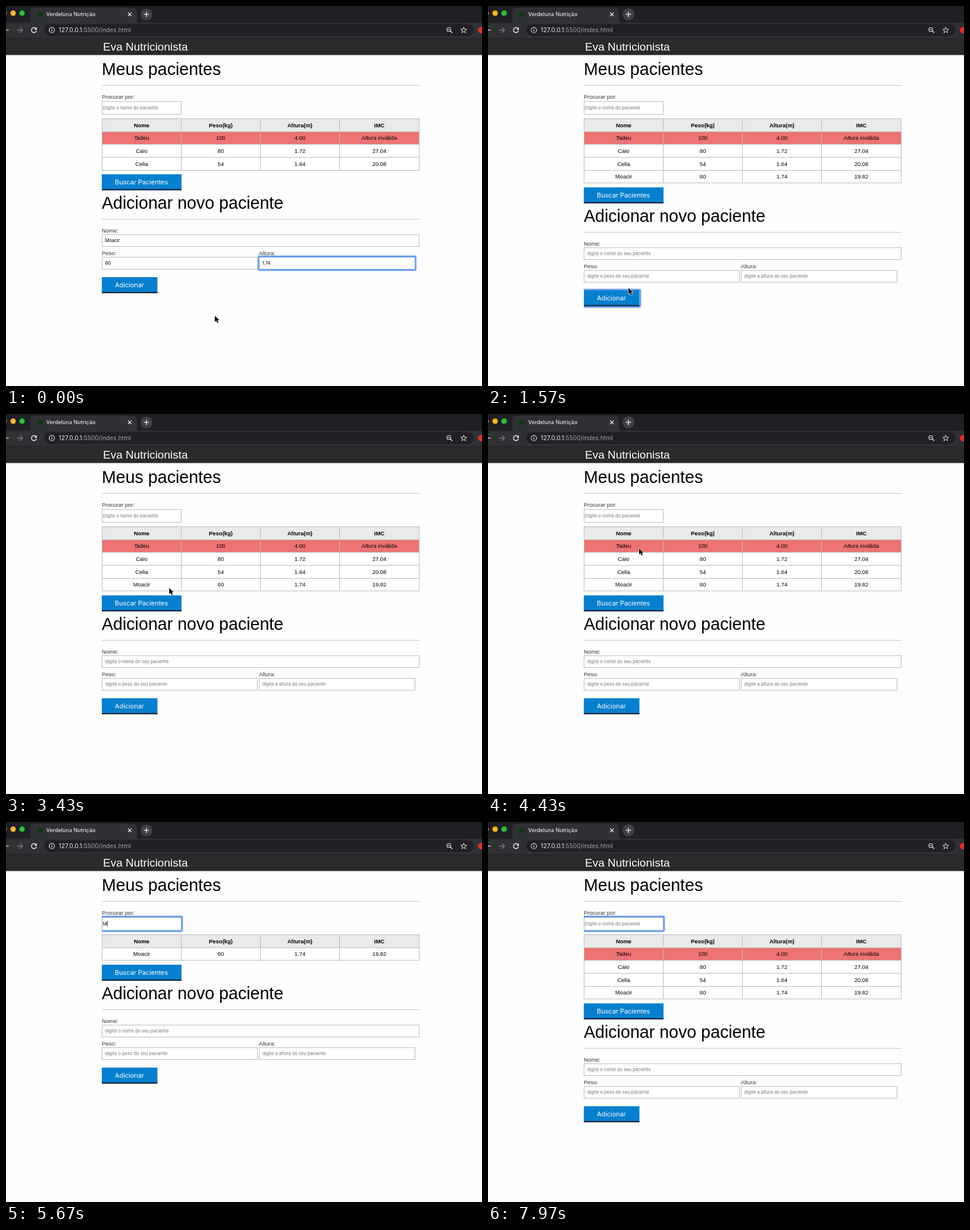
Write an HTML page with a canvas that moves like this. It is 800 px wide and 639 px high and loops after 8000 ms.

```html
<!DOCTYPE html>
<html lang="pt">
<head>
<meta charset="utf-8">
<title>Verdeluna Nutrição</title>
<style>
html, body { margin: 0; width: 100%; height: 100%; overflow: hidden; background: #fefefe; }
canvas { display: block; width: 800px; height: 639px; }
</style>
</head>
<body>
<canvas id="stage"></canvas>
<script>
const LOOP = 8000, ROW = 21.65;
const ADD_DOWN = 1200, ADD_UP = 1300, BLUR = 2950, SEARCH_FOCUS = 4900, TYPE_START = 5500;
const SANS = '"Liberation Sans", Arial, sans-serif';
const UI = 'Inter, Roboto, sans-serif';
const BLUE = '#0680ce', LINE = '#bcbcbc', HINT = '#757575';
const COLS = [161.5, 294.5, 427.5, 560.5, 694.5];

const PATIENTS = [
  ['Tadeu', '100', '4.00', 'Altura inválida'],
  ['Caio', '80', '1.72', '27.04'],
  ['Celia', '54', '1.64', '20.08'],
  ['Moacir', '60', '1.74', '19.82']
];
const NEW_NAME = 'Moacir';

// [time, number of letters in the search box]
const KEYS = [
  [5500, 1], [5700, 2], [5900, 3], [6120, 4], [6400, 5], [7050, 6],
  [7260, 5], [7320, 4], [7380, 3], [7440, 2], [7500, 1], [7560, 0]
];
// [time, x, y]
const PATH = [
  [150, 351, 521], [850, 236, 474], [1700, 236, 474], [2400, 295, 361],
  [2750, 295, 361], [4100, 254, 226], [4450, 254, 226], [4850, 222, 171]
];

const canvas = document.getElementById('stage');
const ctx = canvas.getContext('2d');
const dpr = window.devicePixelRatio || 1;
canvas.width = 800 * dpr;
canvas.height = 639 * dpr;

function rect(x, y, w, h, color) {
  ctx.fillStyle = color;
  ctx.fillRect(x, y, w, h);
}

function disc(x, y, r, color) {
  ctx.fillStyle = color;
  ctx.beginPath();
  ctx.arc(x, y, r, 0, 7);
  ctx.fill();
}

function round(x, y, w, h, r, color) {
  ctx.fillStyle = color;
  ctx.beginPath();
  ctx.roundRect(x, y, w, h, r);
  ctx.fill();
}

function trace(points, color, width = 1, closed = false) {
  ctx.beginPath();
  points.forEach(([x, y], i) => i ? ctx.lineTo(x, y) : ctx.moveTo(x, y));
  if (closed) ctx.closePath();
  ctx.strokeStyle = color;
  ctx.lineWidth = width;
  ctx.stroke();
}

function arc(x, y, r, color, width, from = 0, to = Math.PI * 2) {
  ctx.beginPath();
  ctx.arc(x, y, r, from, to);
  ctx.strokeStyle = color;
  ctx.lineWidth = width;
  ctx.stroke();
}

function text(str, x, y, size, color, { font = SANS, weight = 400, align = 'left' } = {}) {
  ctx.font = `${weight} ${size}px ${font}`;
  ctx.textAlign = align;
  ctx.fillStyle = color;
  ctx.fillText(str, x, y);
  return ctx.measureText(str).width;
}

function box(x, y, w, h) {
  rect(x, y, w, h, '#fff');
  ctx.strokeStyle = LINE;
  ctx.lineWidth = 1;
  ctx.strokeRect(x + .5, y + .5, w - 1, h - 1);
}

function ring(x, y, w, h) {
  ctx.save();
  ctx.beginPath();
  ctx.rect(161, 83, 536, 556);
  ctx.clip();
  for (const [grow, width, color] of [[1.4, 4, 'rgba(90,150,240,.25)'], [.8, 2.2, '#5c97ee']]) {
    ctx.beginPath();
    ctx.roundRect(x - grow, y - grow, w + 2 * grow, h + 2 * grow, 2);
    ctx.strokeStyle = color;
    ctx.lineWidth = width;
    ctx.stroke();
  }
  ctx.restore();
}

function field(x, y, w, value, hint) {
  box(x, y, w, 21);
  text(value || hint, x + 5.7, y + 13.4, 7.5, value ? '#000' : HINT, { font: UI });
}

function button(label, y, w) {
  rect(161, y, w, 27, BLUE);
  rect(161, y + 24.8, w, 2.2, '#07263b');
  text(label, 183, y + 17.3, 10.9, '#fff', { font: UI });
}

function drawBrowser() {
  const white = '#e9eaec', grey = '#7f8185';
  rect(0, 0, 800, 28, '#1e2023');
  disc(-3, 12, 4.5, '#ee5f57');
  disc(12, 12, 4.6, '#f6b52d');
  disc(27, 12, 4.6, '#2bc03f');
  round(41, 3, 179, 32, 6, '#2f3134');
  rect(0, 28, 800, 26, '#2f3134');
  disc(56.5, 14, 4.5, '#0c3713');
  text('Verdeluna Nutrição', 67.5, 17.3, 9, '#e4e5e7', { font: UI, weight: 500 });
  trace([[205, 11], [211, 17]], white, 1.3);
  trace([[211, 11], [205, 17]], white, 1.3);
  disc(236, 14, 10.3, '#3d3f42');
  trace([[231.5, 14], [240.5, 14]], white, 1.4);
  trace([[236, 9.5], [236, 18.5]], white, 1.4);

  trace([[-4, 40.5], [4.5, 40.5]], white, 1.3);
  trace([[18.5, 40.5], [27.5, 40.5]], grey, 1.3);
  trace([[23.5, 36.3], [27.7, 40.5], [23.5, 44.7]], grey, 1.3);
  arc(47, 40.5, 4.2, white, 1.4, .3, 5.4);
  ctx.fillStyle = white;
  ctx.beginPath();
  ctx.moveTo(52, 35.5);
  ctx.lineTo(52, 40);
  ctx.lineTo(47.5, 40);
  ctx.fill();

  round(64, 30.5, 722, 20, 10, '#1f2124');
  arc(77, 40.5, 4.5, white, 1.1);
  rect(76.4, 39.8, 1.2, 3.2, white);
  rect(76.4, 37.8, 1.2, 1.2, white);
  const host = text('127.0.0.1', 88.5, 44.2, 10.3, '#eceded', { font: UI });
  text(':5500/index.html', 88.5 + host, 44.2, 10.3, '#a0a2a6', { font: UI });
  arc(744.2, 39.5, 3.3, white, 1.1);
  trace([[746.6, 41.9], [750, 45.3]], white, 1.4);
  trace([[742.6, 39.5], [745.8, 39.5]], white, 1);
  const star = Array.from({ length: 10 }, (_, i) => {
    const r = i % 2 ? 2.2 : 5.2, a = i * Math.PI / 5 - Math.PI / 2;
    return [769.3 + r * Math.cos(a), 40.8 + r * Math.sin(a)];
  });
  trace(star, white, 1, true);
  disc(799, 40.5, 5.5, '#e2302f');

  rect(0, 54, 800, 28.5, '#2b2a2b');
  rect(0, 54, 800, 1, '#222223');
  text('Eva Nutricionista', 163, 75.3, 19, '#fff');
}

const lineY = i => Math.floor(189.5 + i * ROW) + .5;

function drawTable(rows) {
  const bottom = lineY(rows.length + 1);
  rect(161.5, 189.5, 533, bottom - 189.5, '#fff');
  rect(161.5, 189.5, 533, ROW, '#eae9ec');
  rows.forEach((row, i) => {
    if (row === PATIENTS[0]) rect(161.5, lineY(i + 1), 533, ROW, '#ee7373');
  });
  for (let i = 0; i <= rows.length + 1; i++) trace([[161, lineY(i)], [695, lineY(i)]], LINE);
  COLS.forEach(x => trace([[x, 189], [x, bottom]], LINE));
  [['Nome', 'Peso(kg)', 'Altura(m)', 'IMC'], ...rows].forEach((row, i) => {
    row.forEach((cell, c) => {
      const style = { align: 'center', weight: i ? 400 : 700 };
      text(cell, (COLS[c] + COLS[c + 1]) / 2, 203.8 + i * ROW, 9.45, '#000', style);
    });
  });
}

function drawSearch(t, query, lastKey) {
  text('Procurar por:', 161, 156, 9.45, '#333');
  box(161, 160, 134, 22.5);
  const style = { font: UI };
  const width = text(query || 'Digite o nome do paciente', 162.8, 173.7, 7.5, query ? '#000' : HINT, style);
  if (t < SEARCH_FOCUS) return;
  ring(161, 160, 134, 22.5);
  if ((t - lastKey) % 800 < 400) rect(163 + (query ? width : 0), 166.5, .9, 9, '#000');
}

function drawForm(t, dy) {
  const filled = t < ADD_UP;
  text('Adicionar novo paciente', 161, 341 + dy, 28.6, '#000');
  trace([[161, 358.5 + dy], [695, 358.5 + dy]], '#c4c4c4');
  text('Nome:', 161, 381 + dy, 9.45, '#333');
  field(161, 384 + dy, 534, filled && NEW_NAME, 'digite o nome do seu paciente');
  text('Peso:', 161, 419 + dy, 9.45, '#333');
  field(161, 422 + dy, 262, filled && '60', 'digite o peso do seu paciente');
  text('Altura:', 425, 419 + dy, 9.45, '#333');
  field(425, 422 + dy, 263, filled && '1.74', 'digite a altura do seu paciente');
  button('Adicionar', 456 + dy, 93.5);
  if (t < ADD_DOWN) ring(425.5, 422 + dy, 262, 21);
  else if (t < BLUR) ring(161, 456 + dy, 94, 27);
}

const ease = u => u * u * (3 - 2 * u);

function pointerAt(t) {
  const next = PATH.findIndex(p => p[0] > t);
  if (next === 0) return PATH[0].slice(1);
  if (next < 0) return PATH[PATH.length - 1].slice(1);
  const [t0, x0, y0] = PATH[next - 1], [t1, x1, y1] = PATH[next];
  const u = ease((t - t0) / (t1 - t0));
  return [x0 + (x1 - x0) * u, y0 + (y1 - y0) * u];
}

function pointerKind(x, y, dy) {
  const within = (l, top, r, b) => x > l && x < r && y > top && y < b;
  if (within(161, 283 + dy, 295, 310 + dy) || within(161, 456 + dy, 254, 483 + dy)) return 'hand';
  const texts = [[161, 160, 295, 182], [161, 317 + dy, 466, 348 + dy],
    [161, 384 + dy, 695, 405 + dy], [161, 422 + dy, 688, 443 + dy]];
  return texts.some(b => within(...b)) ? 'beam' : 'arrow';
}

function outline(path, fill, edge) {
  const shape = new Path2D(path);
  ctx.lineJoin = 'round';
  ctx.strokeStyle = edge;
  ctx.lineWidth = 1.3;
  ctx.stroke(shape);
  ctx.fillStyle = fill;
  ctx.fill(shape);
  ctx.lineJoin = 'miter';
}

function drawPointer(x, y, kind) {
  ctx.save();
  ctx.translate(x, y);
  if (kind === 'arrow') {
    outline('M0 0V10.2L2.4 8L4.2 12L6 11.2L4.3 7.3H7.4Z', '#000', '#fff');
  } else if (kind === 'hand') {
    outline('M-1.5 0.3Q-.4-.9.6.3L2 4L3.2 3.7L4.4 4.2L5.4 4.4Q6.4 4.8 6.3 6.5L5.3 11.5H-.4L-4 7.2Q-4.3 5.7-2.8 6L-.8 7Z', '#fff', '#000');
    trace([[1.5, 7], [1.7, 9.5]], '#000', .6);
    trace([[3.3, 7], [3.4, 9.5]], '#000', .6);
  } else {
    const parts = [[[0, -5], [0, 5]], [[-2.5, -6], [0, -5], [2.5, -6]], [[-2.5, 6], [0, 5], [2.5, 6]]];
    parts.forEach(p => trace(p, '#fff', 2.4));
    parts.forEach(p => trace(p, '#222', 1));
  }
  ctx.restore();
}

function draw(t) {
  ctx.setTransform(dpr, 0, 0, dpr, 0, 0);
  rect(0, 0, 800, 639, '#fefefe');
  const pressed = KEYS.filter(k => k[0] <= t);
  const [lastKey, letters] = pressed.length ? pressed[pressed.length - 1] : [SEARCH_FOCUS, 0];
  const query = NEW_NAME.slice(0, letters);
  const listed = t < ADD_UP ? PATIENTS.slice(0, 3) : PATIENTS;
  const rows = listed.filter(p => p[0].startsWith(query));
  const dy = Math.round((rows.length - 3) * ROW);

  drawBrowser();
  text('Meus pacientes', 161, 115.8, 28.6, '#000');
  trace([[161, 133.5], [695, 133.5]], '#c4c4c4');
  drawSearch(t, query, lastKey);
  drawTable(rows);
  button('Buscar Pacientes', 283 + dy, 134);
  drawForm(t, dy);
  if (t < TYPE_START) {
    const [x, y] = pointerAt(t);
    drawPointer(x, y, x === 295 && y === 361 ? 'beam' : pointerKind(x, y, dy));
  }
}

const start = performance.now();
function tick() {
  draw((performance.now() - start) % LOOP);
  requestAnimationFrame(tick);
}
tick();
</script>
</body>
</html>
```
